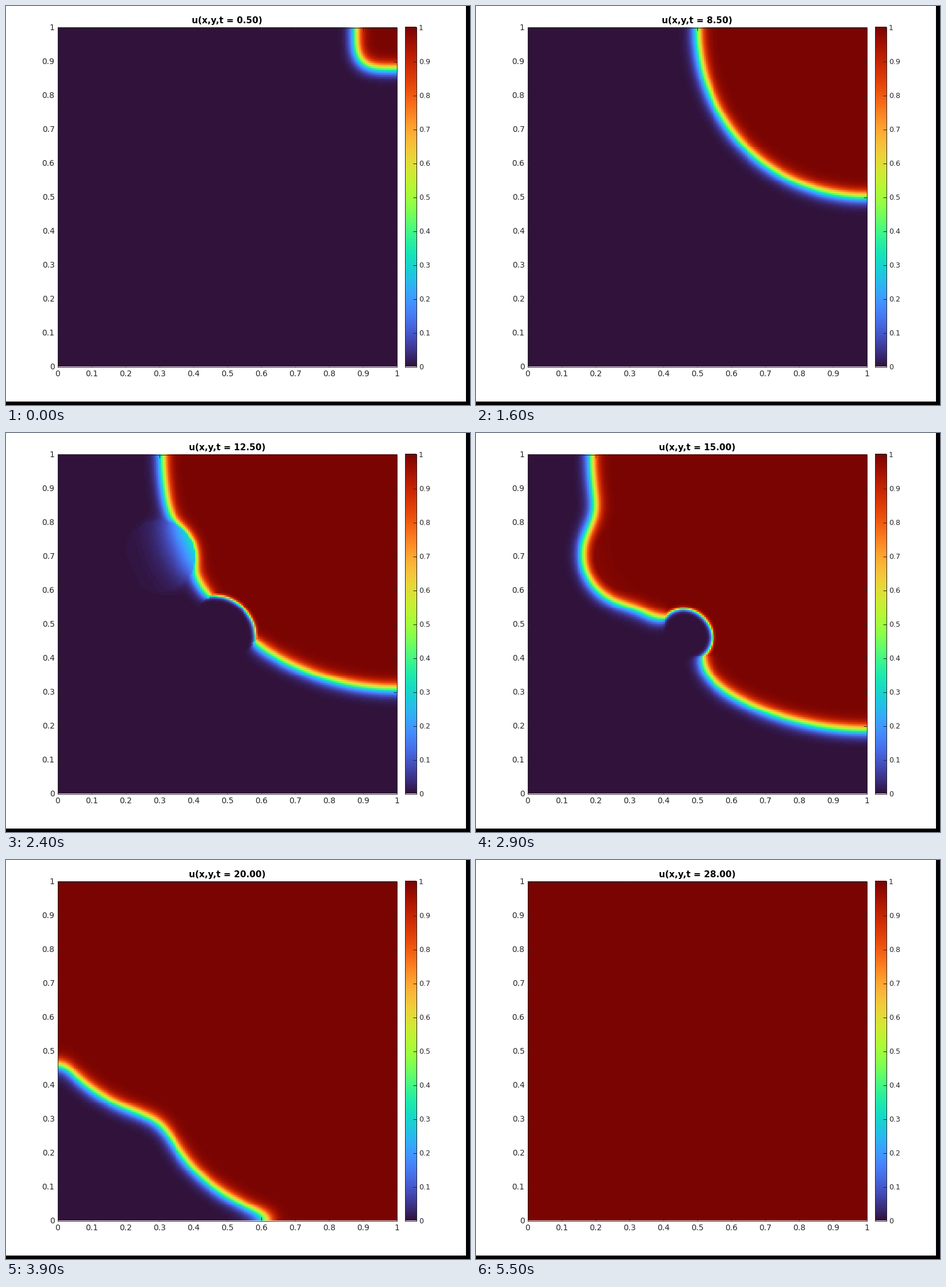
Animation, 807 px wide and 694 px high, one loop 5600 ms. Source, as a matplotlib script:

```python
import numpy as np
import matplotlib.pyplot as plt
from matplotlib.animation import FuncAnimation

W, H, DPI = 807, 694, 100
FRAMES, INTERVAL = 56, 100
N = 200                       # grid cells per side
RATE, THRESHOLD = 20.0, 0.25  # bistable reaction
DIFFUSION = 1e-3
DT, SUBSTEPS = 0.004, 8
STEP_TIME = 0.5               # simulated time per frame
LEFT, RIGHT, TOP, BOTTOM = 90, 680, 37, 627
INK = "#262626"


def diffusivity(x, y):
    """Uniform medium with one fast disk and one slow disk."""
    d = np.full(x.shape, DIFFUSION)
    d[np.hypot(x - 0.3, y - 0.7) < 0.1] = DIFFUSION * 10
    d[np.hypot(x - 0.5, y - 0.5) < 0.1] = DIFFUSION / 10
    return d


def faces(d, dt):
    """Exchange weights between horizontal and vertical neighbours."""
    k = d * dt * N * N
    return (k[:, 1:] + k[:, :-1]) / 2, (k[1:] + k[:-1]) / 2


def diffuse(u, wx, wy):
    fx = wx * (u[:, 1:] - u[:, :-1])
    fy = wy * (u[1:] - u[:-1])
    u[:, :-1] += fx
    u[:, 1:] -= fx
    u[:-1] += fy
    u[1:] -= fy


def simulate():
    """Bistable front with no flux through the walls."""
    c = (np.arange(N) + 0.5) / N
    x, y = np.meshgrid(c, c)
    d = diffusivity(x, y)
    slow = np.minimum(d, DIFFUSION)
    patch = np.s_[118:162, 38:82]     # holds the fast disk
    base = faces(slow, DT)
    extra = faces((d - slow)[patch], DT / SUBSTEPS)

    u = ((x > 0.9) & (y > 0.9)).astype(float)
    states = []
    for _ in range(FRAMES):
        for _ in range(round(STEP_TIME / DT)):
            growth = RATE * DT * u * (1 - u) * (u - THRESHOLD)
            diffuse(u, *base)
            u += growth
            for _ in range(SUBSTEPS):
                diffuse(u[patch], *extra)
        states.append(u.copy())
    return states


states = simulate()

fig = plt.figure(figsize=(W / DPI, H / DPI), dpi=DPI, facecolor="white")
ax = fig.add_axes([0, 0, 1, 1])
ax.axis("off")


def line(xs, ys):
    ax.plot(xs, ys, color=INK, lw=0.72, solid_capstyle="butt", zorder=3)


def box(x0, x1, y0, y1):
    line([x0, x1, x1, x0, x0], [y0, y0, y1, y1, y0])


def label(x, y, text, size, ha):
    ax.text(x, y, text, size=size, ha=ha, va="baseline", color=INK,
            family="DejaVu Sans")


field = ax.imshow(states[0], cmap="turbo", vmin=0, vmax=1, origin="lower",
                  extent=(LEFT, RIGHT, BOTTOM, TOP), interpolation="nearest")
ax.imshow(np.linspace(0, 1, 256)[:, None], cmap="turbo", origin="lower",
          extent=(694, 714, BOTTOM, 36), interpolation="nearest")
ax.fill([800, W, W, 800], [0, 0, H, H], color="black", lw=0)
ax.fill([0, W, W, 0], [688, 688, H, H], color="black", lw=0)

box(LEFT - 0.5, RIGHT - 0.5, TOP + 0.5, BOTTOM + 0.5)
box(693.5, 713.5, 36.5, BOTTOM + 0.5)

for i in range(11):
    name = f"{i / 10:g}"
    x = LEFT - 0.5 + 59 * i
    y = BOTTOM + 0.5 - 59 * i
    line([x, x], [TOP, TOP + 6])
    line([x, x], [BOTTOM - 6, BOTTOM])
    line([LEFT, LEFT + 6], [y, y])
    line([RIGHT - 6, RIGHT], [y, y])
    line([708, 714], [y, y])
    label(x + 0.3, 644.5, name, 10, "center")
    label(84.5, y + 4.5, name, 10, "right")
    label(718, y + 4.2, name, 9, "left")

title = ax.text(384.5, 30, "", size=11, weight="bold", ha="center",
                va="baseline", color="black", family="DejaVu Sans")

ax.set_xlim(0, W)
ax.set_ylim(H, 0)
ax.set_aspect("auto")


def draw(i):
    field.set_data(states[i])
    title.set_text(f"u(x,y,t = {STEP_TIME * (i + 1):.2f})")
    return field, title


anim = FuncAnimation(fig, draw, frames=FRAMES, interval=INTERVAL, repeat=True,
                     repeat_delay=0, blit=False)
plt.show()
```
